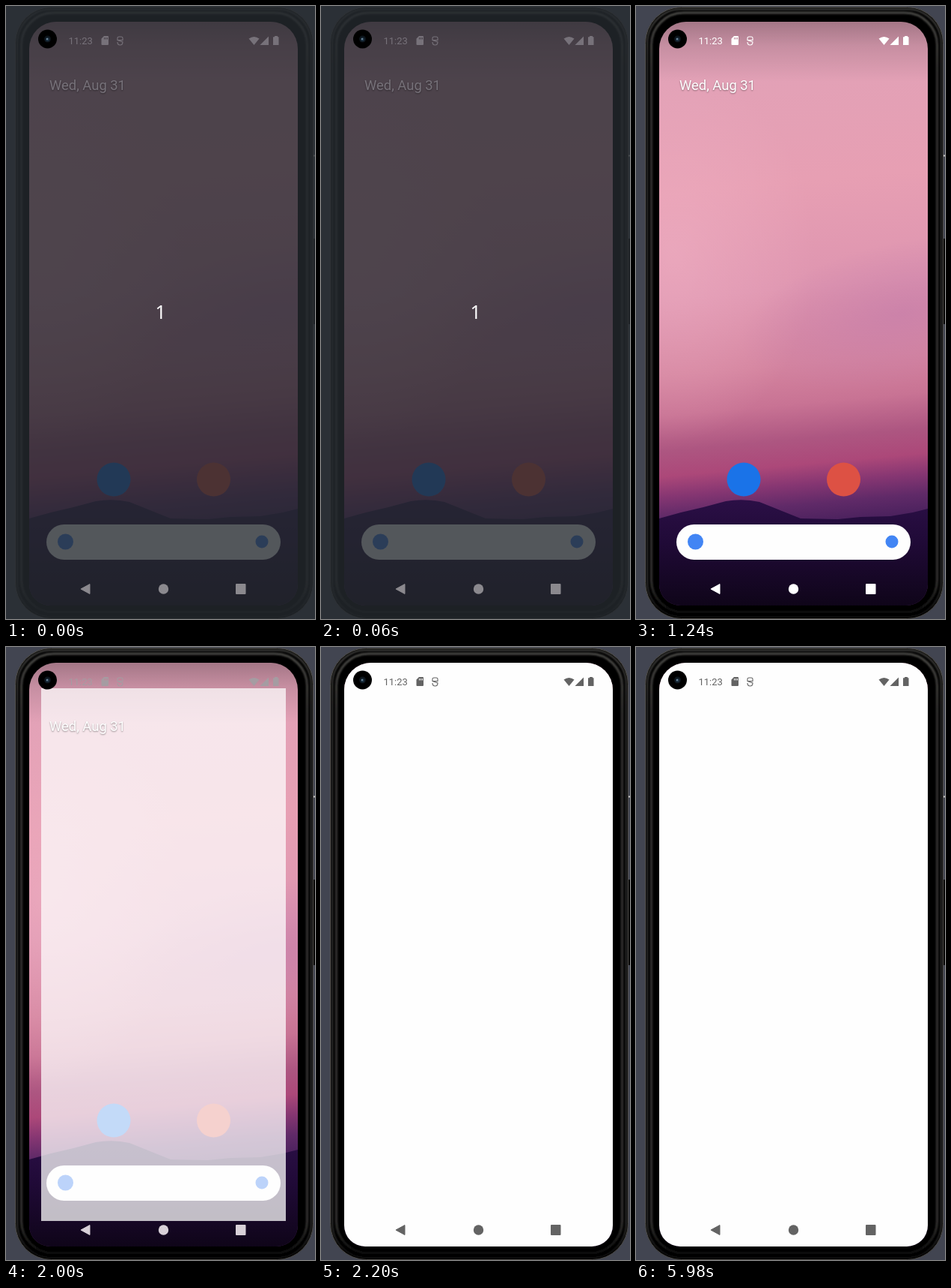
These frames come from a looping animation (413 px wide and 817 px high, 8500 ms). An HTML page:

```html
<!DOCTYPE html>
<html lang="en">
<head>
<meta charset="utf-8">
<title>App launch</title>
<style>
  html, body { margin: 0; width: 100%; height: 100%; overflow: hidden; background: #424551; }
  svg { display: block; width: 413px; height: 817px; }
  text { font-family: Roboto, sans-serif; }
  #date { font-size: 18.4px; text-shadow: 0 1px 2px #0006; }
</style>
</head>
<body>
<svg viewBox="0 0 413 817">
  <defs>
    <linearGradient id="sky" gradientUnits="userSpaceOnUse" x1="180" y1="21" x2="240" y2="690">
      <stop offset="0" stop-color="#e0a2b8"/>
      <stop offset=".32" stop-color="#e79fb3"/>
      <stop offset=".53" stop-color="#de95b0"/>
      <stop offset=".68" stop-color="#d4849f"/>
      <stop offset=".76" stop-color="#c87394"/>
      <stop offset=".83" stop-color="#ad5681"/>
      <stop offset=".88" stop-color="#ac4879"/>
      <stop offset=".92" stop-color="#863672"/>
      <stop offset=".96" stop-color="#602a68"/>
      <stop offset="1" stop-color="#4a215d"/>
    </linearGradient>
    <linearGradient id="shade" x1="0" y1="0" x2="0" y2="1">
      <stop offset="0" stop-opacity=".27"/>
      <stop offset=".4" stop-opacity=".12"/>
      <stop offset="1" stop-opacity="0"/>
    </linearGradient>
    <radialGradient id="glow">
      <stop offset="0" stop-color="#f0b1c4" stop-opacity=".55"/>
      <stop offset="1" stop-color="#f0b1c4" stop-opacity="0"/>
    </radialGradient>
    <radialGradient id="haze">
      <stop offset="0" stop-color="#c67eaa" stop-opacity=".7"/>
      <stop offset="1" stop-color="#c67eaa" stop-opacity="0"/>
    </radialGradient>
    <linearGradient id="hill" x1="0" y1="0" x2="0" y2="1">
      <stop offset="0" stop-color="#2b0f46"/>
      <stop offset=".4" stop-color="#200a37"/>
      <stop offset="1" stop-color="#0f0519"/>
    </linearGradient>
    <linearGradient id="metal" x1="0" y1="0" x2="0" y2="1">
      <stop offset="0" stop-color="#4a4946"/>
      <stop offset=".1" stop-color="#343331"/>
      <stop offset=".95" stop-color="#343331"/>
      <stop offset="1" stop-color="#0c0c0c"/>
    </linearGradient>
    <filter id="soft"><feGaussianBlur stdDeviation=".8"/></filter>
    <clipPath id="screen">
      <path d="M31 57a36 36 0 0 1 36-36H354a36 36 0 0 1 36 36V771a28 28 0 0 1-28 28H59a28 28 0 0 1-28-28Z"/>
    </clipPath>
  </defs>

  <rect width="413" height="817" fill="#424551"/>

  <!-- phone body -->
  <rect x="411" y="310" width="3" height="114" fill="#000"/>
  <rect x="411" y="198.500" width="2" height="2" fill="#ccc"/>
  <rect x="12.500" y="1.500" width="398" height="815" rx="48" fill="#000" stroke="#55534f"/>
  <g fill="none" stroke="url(#metal)" filter="url(#soft)">
    <rect x="15" y="4" width="393" height="810" rx="46" stroke-width="2"/>
    <rect x="20.500" y="9" width="382" height="799" rx="43" stroke-width="3"/>
  </g>

  <g clip-path="url(#screen)">
    <rect x="31" y="21" width="359" height="778" fill="url(#sky)"/>
    <ellipse cx="50" cy="330" rx="190" ry="250" fill="url(#glow)"/>
    <ellipse cx="355" cy="410" rx="220" ry="95" fill="url(#haze)" transform="rotate(-12 355 410)"/>
    <rect x="31" y="21" width="359" height="80" fill="url(#shade)"/>
    <path fill="url(#hill)" d="M31 683L60 675 90 668 120 660Q143 656 165 661L195 673 220 683 270 684 300 681 340 680 370 675 390 670V799H31Z"/>
    <circle cx="144" cy="631" r="22.500" fill="#1a73e8"/>
    <circle cx="277.500" cy="631" r="22.500" fill="#dd5144"/>
    <rect id="window" fill="#fefefe"/>
    <g id="search">
      <rect x="54" y="691" width="313" height="47" rx="23.500" fill="#fefefe"/>
      <g id="marks" fill="#4285f4">
        <circle cx="79.500" cy="714" r="10.500"/>
        <circle cx="342" cy="714" r="8.500"/>
      </g>
    </g>
  </g>

  <rect id="dim" width="413" height="817" fill="#262a30" opacity=".79"/>
  <text id="date" x="58" y="112">Wed, Aug 31</text>

  <g id="status">
    <text x="83.500" y="51" font-size="13">11:23</text>
    <path fill-rule="evenodd" d="M131 40h5q1 0 1 1v10q0 1-1 1h-7.500q-1 0-1-1v-7.500ZM131 42v2.500h1V42Zm2 0v2.500h1V42Zm2 0v2.500h1V42Z"/>
    <path d="M149 45.500V43q0-2 2-2h3q2 0 2 2v2.500ZM149 45.500l7 2.500q0 4-3.500 4t-3.500-4" fill="none" stroke="currentColor" stroke-width="1.100"/>
    <path d="M324.500 43.500Q331.500 38.500 338.500 43.500L331.500 52Z"/>
    <path d="M351 40.500V52H339.500Z"/>
    <path d="M359 40h4v1.200h1.500V52h-7.500V41.200h2Z"/>
  </g>

  <g id="nav">
    <path d="M100 777L112 770.500V783.500Z" stroke="currentColor" stroke-linejoin="round"/>
    <circle cx="210.500" cy="777" r="6.700"/>
    <rect x="307" y="770" width="13.500" height="14" rx="1"/>
  </g>

  <g id="camera">
    <circle cx="55.500" cy="44" r="12.500" fill="#000"/>
    <circle cx="55.500" cy="44" r="4.500" fill="#0d151c"/>
    <circle cx="55.500" cy="44.500" r="2.500" fill="#1d3243"/>
    <circle cx="55" cy="44" r="1.200" fill="#6e8799"/>
  </g>
  <text id="count" x="199.500" y="417" font-size="25" fill="#fff" style="font-family:'Noto Sans',sans-serif">1</text>
</svg>
<script>
  const LOOP = 8500;
  // Hard steps: window is [x, y, width, height, radius, opacity].
  const home = { until: 2000, window: [47, 55, 327, 710, 0, 0], status: '#fff', nav: '#fff', home: 1, marks: 1 };
  const steps = [
    { ...home, until: 100, dim: true, status: '#77727a', nav: '#8b898e' },
    home,
    { ...home, until: 2100, window: [47, 55, 327, 710, 0, .74], status: '#a59ca2', nav: '#d8d0d8', marks: .35 },
    { until: 2200, window: [35, 29, 351, 762, 8, 1], status: '#666', nav: '#777', home: 0, marks: 0 },
    { until: LOOP, window: [31, 21, 359, 778, 0, 1], status: '#636363', nav: '#636363', home: 0, marks: 0 }
  ];
  const $ = id => document.getElementById(id);
  const set = (id, attrs) => {
    for (const name in attrs) $(id).setAttribute(name, attrs[name]);
  };

  function draw(now) {
    const time = now % LOOP;
    const step = steps.find(s => time < s.until);
    const [x, y, width, height, rx, opacity] = step.window;
    set('window', { x, y, width, height, rx, opacity });
    set('status', { fill: step.status, color: step.status });
    set('nav', { fill: step.nav, color: step.nav });
    set('search', { opacity: step.home });
    set('marks', { opacity: step.marks });
    set('date', { opacity: step.home, fill: step.dim ? '#77727a' : '#fff' });
    set('dim', { visibility: step.dim ? 'visible' : 'hidden' });
    set('count', { visibility: step.dim ? 'visible' : 'hidden' });
  }

  const start = performance.now();
  function tick() {
    draw(performance.now() - start);
    requestAnimationFrame(tick);
  }
  tick();
</script>
</body>
</html>
```
